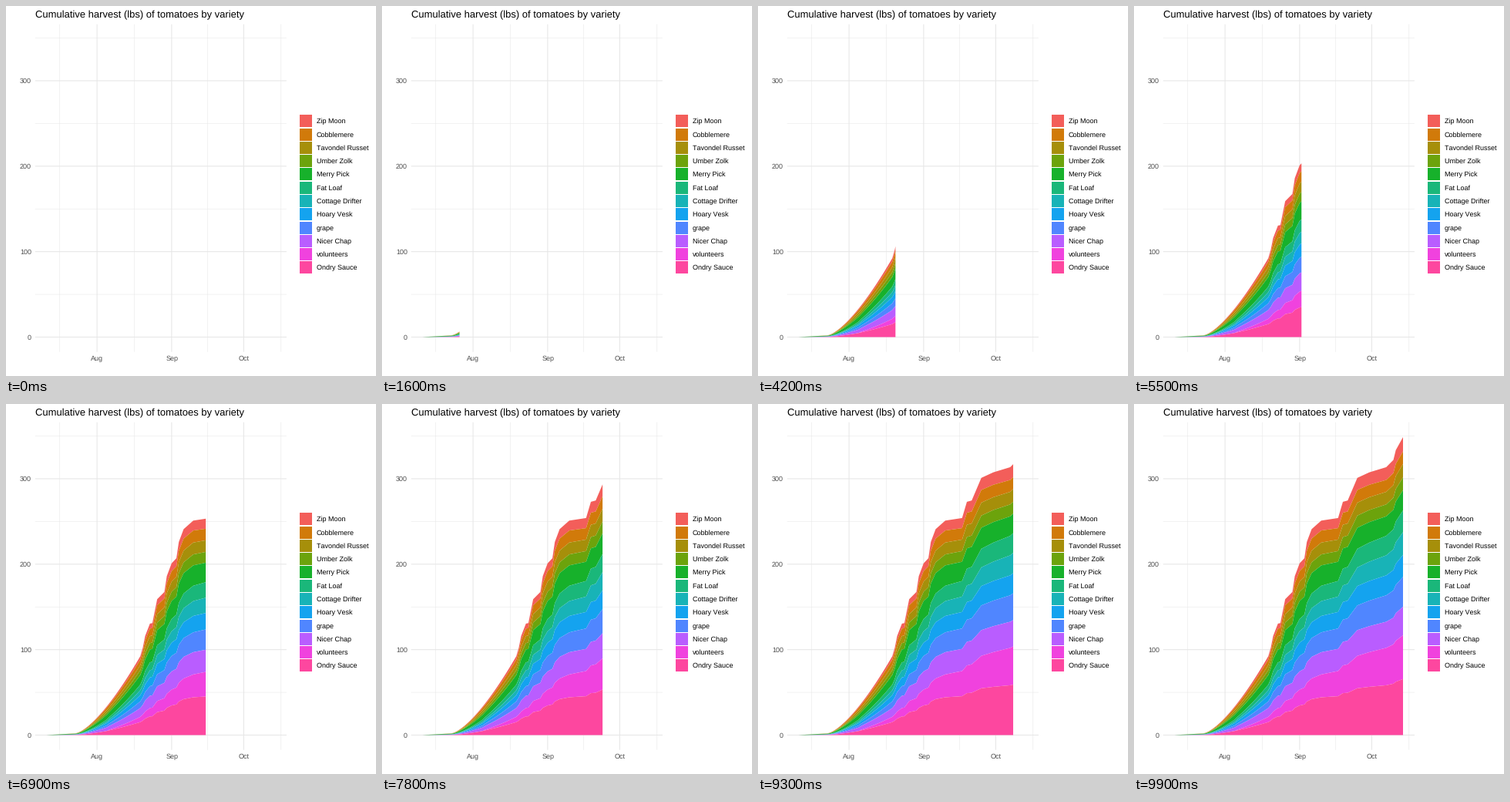
Recreate the animation shown at these times as a matplotlib script. Size 480 by 480 pixels, loop 10 s.

```python
import matplotlib.pyplot as plt
import numpy as np
from matplotlib.animation import FuncAnimation
from matplotlib.patches import Polygon, Rectangle

plt.rcParams.update({
    "font.family": "Liberation Sans",
    "text.hinting": "none",
    "text.hinting_factor": 1,
    "path.simplify": False,
})

SIZE, FRAMES, LAST_DAY = 480, 100, 95
LEFT, RIGHT, TOP, BOTTOM = 37.8, 363.9, 23.7, 448.7
DAY0_X, DAY_W = 52.6, 3.12        # day 0 is July 11
ZERO_Y, LB_H = 429.5, 1.1085

# Legend order: name, colour, percent of the harvest early and late
VARIETIES = [
    ("Zip Moon", "#F35E5A", 4, 4.8),
    ("Cobblemere", "#D17A0A", 9, 4.2),
    ("Tavondel Russet", "#A68F0A", 8, 4.5),
    ("Umber Zolk", "#6CA30C", 7, 4.3),
    ("Merry Pick", "#17B12B", 16, 6.8),
    ("Fat Loaf", "#1AB77A", 6.5, 7.3),
    ("Cottage Drifter", "#18B3B7", 5, 7.6),
    ("Hoary Vesk", "#14A3EF", 8, 7.4),
    ("grape", "#5086FF", 7, 10),
    ("Nicer Chap", "#B95DFF", 12, 9.6),
    ("volunteers", "#F042DE", 0, 14.7),
    ("Ondry Sauce", "#FD479F", 14, 18.8),
]
NAMES, COLORS, EARLY, LATE = zip(*VARIETIES)

# (day, pounds): the big pickings after the steady first weeks
PICKINGS = [
    (40, 102), (41, 116), (43, 130.5), (44, 131), (46, 159), (49, 167.5),
    (50, 186), (52, 201), (54, 207), (55, 226), (57, 241), (61, 251),
    (68, 254), (70, 273), (72, 274.5), (76, 301), (81, 307.5), (88, 313.5),
    (91, 322), (92, 333.5), (95, 348.7),
]

days = np.arange(LAST_DAY + 1)


def total_harvest():
    first = np.arange(40)
    steady = (np.minimum(first / 6, 2)
              + 0.76 * np.maximum(first - 12, 0) ** 1.45)
    late_days, late_lbs = zip(*PICKINGS)
    return np.interp(days, np.append(first, late_days),
                     np.append(steady, late_lbs))


def stack_levels():
    """Cumulative pounds per day for each band edge, top to bottom."""
    u = np.sqrt(np.clip((days - 25) / 70, 0, 1))
    mix = np.outer(EARLY, 1 - u) + np.outer(LATE, u)
    mix[NAMES.index("Merry Pick")] += 400 * np.exp(-days / 4)  # ripens first
    bands = total_harvest() * mix / mix.sum(axis=0)
    below = np.cumsum(bands[::-1], axis=0)[::-1]
    return np.vstack([below, 0 * days])


def px(day):
    return DAY0_X + DAY_W * day


def py(pounds):
    return ZERO_Y - LB_H * pounds


fig = plt.figure(figsize=(SIZE / 72, SIZE / 72), dpi=72, facecolor="white")
ax = fig.add_axes([0, 0, 1, 1])
ax.set_xlim(0, SIZE)
ax.set_ylim(SIZE, 0)
ax.axis("off")


def grid(xs, ys, width):
    style = dict(color="#E7E7E7", lw=width, snap=False,
                 solid_capstyle="butt", zorder=1)
    for y in ys:
        ax.plot([LEFT, RIGHT], [y, y], **style)
    for x in xs:
        ax.plot([x, x], [TOP, BOTTOM], **style)


def label(x, y, text, size=8.8, color="black", ha="left"):
    ax.text(x, y, text, size=size, color=color, ha=ha, va="baseline")


months = {"Aug": 21, "Sep": 52, "Oct": 82}
pounds = range(0, 400, 100)
grid([px(d) for d in (5.5, 36.5, 67, 97.5)],
     [py(v + 50) for v in pounds], 0.53)
grid([px(d) for d in months.values()], [py(v) for v in pounds], 1.07)

label(38, 15.2, "Cumulative harvest (lbs) of tomatoes by variety", 13.36)
for v in pounds:
    label(33, py(v) + 3.2, str(v), color="#4D4D4D", ha="right")
for name, d in months.items():
    label(px(d) + 0.3, 460, name, color="#4D4D4D", ha="center")

for i, (name, color) in enumerate(zip(NAMES, COLORS)):
    cy = 149.32 + 17.28 * i
    ax.add_patch(Rectangle((381.1, cy - 7.95), 15.9, 15.9,
                           fc=color, lw=0, snap=True))
    label(403, cy + 3.1, name)

levels = stack_levels()
areas = [ax.add_patch(Polygon([(0, 0)] * 3, fc=color, lw=0,
                              snap=False, zorder=2))
         for color in COLORS]


def update(i):
    cut = LAST_DAY * i / (FRAMES - 1)
    t = np.append(days[days < cut], cut)
    x = px(t)
    edges = [py(np.interp(t, days, row)) for row in levels]
    for area, high, low in zip(areas, edges, edges[1:]):
        area.set_visible(i > 0)
        area.set_xy(np.column_stack([np.append(x, x[::-1]),
                                     np.append(high, low[::-1])]))
    return areas


anim = FuncAnimation(fig, update, frames=FRAMES, interval=100,
                     repeat=True, repeat_delay=0)
plt.show()
```
